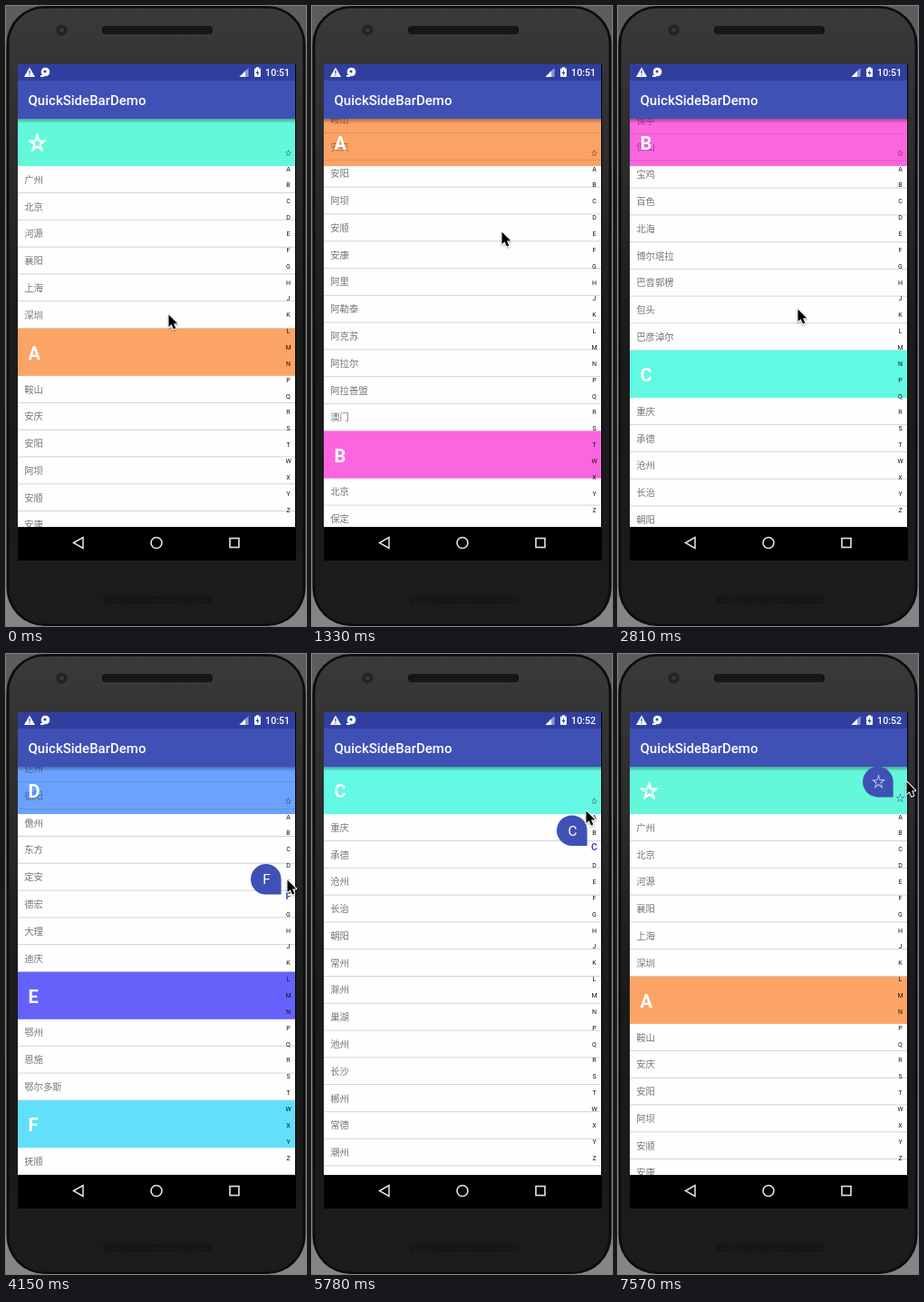
Recreate the animation shown at these times as an HTML page with a canvas. Size 331 by 682 pixels, loop 8000 ms.

```html
<!DOCTYPE html>
<html lang="zh">
<head>
<meta charset="utf-8">
<title>QuickSideBarDemo</title>
<style>
html, body { margin: 0; width: 100%; height: 100%; overflow: hidden; background: #4a4a4c }
canvas { display: block }
</style>
</head>
<body>
<canvas id="stage" width="331" height="682"></canvas>
<script>
const c = document.getElementById('stage').getContext('2d');
const LOOP = 8000, STEP = 148.4;
const LEFT = 13, WIDTH = 306, TOP = 124, VIEW = 449, HEAD = 52.1, ROW = 29.78;
const BLUE = '#3f51b5', NAVY = '#303f9f';
const LETTERS = [...'☆ABCDEFGHJKLMNPQRSTWXYZ'];

const sections = [
  ['#64f9db', '广州 北京 河源 襄阳 上海 深圳'],
  ['#fba465', '鞍山 安庆 安阳 阿坝 安顺 安康 阿里 阿勒泰 阿克苏 阿拉尔 阿拉善盟 澳门'],
  ['#fb66de', '北京 保定 本溪 白山 白城 蚌埠 亳州 滨州 巴中 毕节 白银 白沙 保亭 保山 宝鸡 百色 北海 博尔塔拉 巴音郭楞 包头 巴彦淖尔'],
  ['#62f9e3', '重庆 承德 沧州 长治 朝阳 常州 滁州 巢湖 池州 长沙 郴州 常德 潮州 长春 成都 澄迈 昌江 楚雄 崇左 昌都 昌吉 赤峰'],
  ['#6ba2ff', '大同 大连 丹东 大庆 大兴安岭 东营 德州 东莞 定西 达州 德阳 儋州 东方 定安 德宏 大理 迪庆'],
  ['#6562fb', '鄂州 恩施 鄂尔多斯'],
  ['#62e0fb', '抚顺 阜新 福州 阜阳 抚州 佛山 防城港'],
  ['#fba465', '赣州 广州 广元 广安 甘孜 贵阳 果洛 甘南 固原 桂林 贵港'],
  ['#6ba2ff', '邯郸 衡水 葫芦岛 哈尔滨 鹤岗 黑河 淮安 杭州 湖州 合肥 淮南 淮北 黄山 菏泽 鹤壁 黄石 黄冈 衡阳 怀化 惠州 河源 海口 红河 汉中 海东 河池 贺州 哈密 和田 呼和浩特 呼伦贝尔'],
  ['#fb66de', '晋城 晋中 锦州 吉林 鸡西 佳木斯 嘉兴 金华 景德镇 九江 吉安 济南 济宁 焦作 荆门 荆州 江门 揭阳 嘉峪关 金昌 酒泉'],
  ['#62e0fb', '开封 昆明 克拉玛依 喀什 克孜勒苏'],
  ['#ff6992', '廊坊 临汾 吕梁 辽阳 辽源 连云港 丽水 六安 龙岩 临沂 聊城 洛阳 漯河 娄底 兰州 陇南 临夏 泸州 乐山 凉山 六盘水 临高 乐东 陵水 临沧 丽江 来宾 柳州 拉萨 林芝'],
  ['#64f9db', '牡丹江 马鞍山 茂名 梅州 绵阳 眉山']
].map(([color, names], i) => ({ letter: LETTERS[i], color, rows: names.split(' ') }));

let end = 0;
for (const s of sections) {
  s.top = end;
  end += HEAD + s.rows.length * ROW;
}

// Pointer stops: step, x, y, side bar index
const stops = [
  [0, 179, 339, 0], [9, 209, 248, 0], [19, 198, 333, 0], [28, 310, 248, 6], [35, 308, 341, 12],
  [39, 302, 172, 3], [46, 312, 148, 0], [49, 316, 166, 1], [51, 318, 140, 0]
];
const SWIPES = 3, PICKING = 26;
// List offsets where the swipes begin and end
const rests = [0, sections[2].top - 343.5, sections[3].top - 255, sections[3].top + 280];

const lerp = (a, b, u) => a + (b - a) * u;

function legAt(k) {
  const after = stops.findIndex(p => p[0] > k);
  const i = (after < 0 ? stops.length : after) - 1;
  const from = stops[i], to = stops[i + 1] || from;
  const u = to === from ? 0 : (k - from[0]) / (to[0] - from[0]);
  return { i, u, value: n => lerp(from[n], to[n], u) };
}

function pointerAt(k) {
  const { i, u, value } = legAt(k);
  const lift = i < SWIPES ? 100 * Math.sin(Math.PI * u) : 0;
  return [value(1), value(2) - lift];
}

const pickAt = k => k < PICKING ? -1 : Math.round(legAt(k).value(3));

// Swipes ease between rests; a picked letter scrolls only as far as its first row needs
function scrollAt(k) {
  const { i, u } = legAt(Math.min(k, PICKING - 1));
  let y = lerp(rests[i], rests[i + 1], u * u * (3 - 2 * u));
  for (let j = PICKING; j <= k; j++) {
    const { top } = sections[pickAt(j)];
    y = Math.max(Math.min(y, top), top + HEAD + ROW - VIEW);
  }
  return y;
}

function text(s, x, mid, size, color, weight = 400, align = 'left') {
  c.font = `${weight} ${size}px Roboto, "Noto Sans CJK SC", "Noto Sans CJK JP", sans-serif`;
  c.fillStyle = color;
  c.textAlign = align;
  c.fillText(s, x, mid + size * .36);
}

function box(x, y, w, h, color, r = 0) {
  c.fillStyle = color;
  c.beginPath();
  c.roundRect(x, y, w, h, r);
  c.fill();
}

function paint(fill, stroke, width) {
  if (fill) { c.fillStyle = fill; c.fill(); }
  if (stroke) { c.strokeStyle = stroke; c.lineWidth = width; c.stroke(); }
}

function poly(points, ...style) {
  c.beginPath();
  points.forEach(p => c.lineTo(...p));
  c.closePath();
  paint(...style);
}

function disc(x, y, r, ...style) {
  c.beginPath();
  c.arc(x, y, r, 0, 7);
  paint(...style);
}

function fade(y0, y1, ...colors) {
  const g = c.createLinearGradient(0, y0, 0, y1);
  colors.forEach((v, i) => g.addColorStop(i / (colors.length - 1), v));
  return g;
}

function speaker(x, y, w) {
  box(x, y, w, 9, '#131314', 4);
  c.fillStyle = '#303032';
  for (let i = 3; i < w - 3; i += 3)
    for (let j = 0; j < 3; j++) c.fillRect(x + i + j % 2, y + 1.5 + j * 2.5, 1, 1);
}

function phone() {
  box(0, 0, 331, 682, fade(0, 682, '#5c5c5c', '#868686'));
  box(.5, 0, 330, 682, '#0c0c0d', 42);
  box(3.5, 2.5, 324, 677, fade(0, 682, '#3a3a3b', '#2c2c2d', '#1c1c1d', '#1a1a1b', '#1c1c1d'), 39);
  disc(61.5, 26.5, 6, '#222224', '#2e2e30', 1);
  disc(61.5, 26.5, 2.5, '#39393d');
  speaker(106, 22, 122);
  speaker(107, 649, 121);
  box(LEFT, 64, WIDTH + 1, 546, '#000');
}

function bars(clock) {
  box(LEFT, 64, WIDTH, 18, NAVY);
  box(LEFT, 82, WIDTH, 42, BLUE);
  text('QuickSideBarDemo', 24.5, 104, 15, '#fff', 500);
  text(clock, 313, 73, 10.6, '#fff', 500, 'right');
  poly([[26, 67.5], [32, 78], [20, 78]], '#fff');
  box(25.4, 71, 1.2, 3.5, NAVY);
  box(25.4, 75.5, 1.2, 1.2, NAVY);
  disc(43.5, 72.5, 4.8, '#fff');
  disc(43, 72, 1.5, NAVY);
  box(38, 76, 4, 2, '#fff');
  poly([[267.5, 68], [267.5, 78], [257.5, 78]], '#8f98cc');
  poly([[264, 71.5], [264, 78], [257.5, 78]], '#fff');
  box(274, 68.5, 7, 9.5, '#fff', 1);
  box(276, 67.3, 3, 2, '#fff');
  poly([[278, 70], [275.5, 74], [277.3, 74], [277, 77], [279.5, 73], [277.7, 73]], NAVY);

  poly([[74.5, 590.5], [85, 584.5], [85, 596.5]], null, '#e4e4e4', 1.5);
  disc(166, 590.5, 6, null, '#e4e4e4', 1.6);
  c.strokeRect(247, 585.5, 10, 10);
}

function header(s, y) {
  c.fillStyle = s.color;
  c.fillRect(LEFT, y, WIDTH, HEAD);
}

function headerText({ letter }, y) {
  text(letter, 24.5, y + 27, 20, '#fff', 700);
  if (letter !== '☆') return;
  c.strokeStyle = '#fff';
  c.lineWidth = 1.2;
  c.strokeText(letter, 24.5, y + 34.2);
}

function list(scroll) {
  c.save();
  c.beginPath();
  c.rect(LEFT, TOP, WIDTH, VIEW);
  c.clip();
  box(LEFT, TOP, WIDTH, VIEW, '#fefefe');
  for (const s of sections) {
    const y = TOP + s.top - scroll;
    if (y > TOP) {
      header(s, y);
      headerText(s, y);
    }
    s.rows.forEach((name, i) => {
      const r = y + HEAD + i * ROW;
      if (r < TOP - ROW || r > TOP + VIEW) return;
      text(name, 20.2, r + 14.9, 10.4, '#757575');
      c.fillStyle = '#d4d4d4';
      c.fillRect(LEFT, r + ROW - .8, WIDTH, 1);
    });
  }
  // Sticky header, pushed away by the next one; rows show through faintly
  const n = sections.findLastIndex(s => s.top <= scroll + .01);
  const next = sections[n + 1];
  const y = TOP + Math.min(0, next ? next.top - scroll - HEAD : 0);
  c.globalCompositeOperation = 'multiply';
  header(sections[n], y);
  c.globalCompositeOperation = 'source-over';
  c.globalAlpha = .3;
  header(sections[n], y);
  c.globalAlpha = 1;
  headerText(sections[n], y);
  box(LEFT, TOP, WIDTH, 5, fade(TOP, TOP + 5, 'rgba(0,0,0,.32)', 'rgba(0,0,0,0)'));
  c.restore();
}

function sideBar(pick) {
  LETTERS.forEach((s, i) => {
    const y = 161.2 + i * 17.86;
    if (i === pick) text(s, 311.5, y - 2.6, 10.5, BLUE, 700, 'center');
    else text(s, 311.5, y, 7, '#111', 400, 'center');
  });
  if (pick < 0) return;
  const y = 140.6 + pick * 17.86;
  box(270, y - 16.8, 33.6, 33.6, BLUE, [17, 17, 0, 17]);
  text(LETTERS[pick], 287.5, y, 15.5, '#fff', 400, 'center');
}

function pointer(x, y) {
  c.save();
  c.translate(x, y);
  c.shadowColor = 'rgba(0,0,0,.35)';
  c.shadowBlur = 2;
  c.shadowOffsetY = 1;
  c.lineJoin = 'round';
  const arrow = [[.5, .5], [.5, 14], [3.6, 11.2], [6, 16.6], [8.3, 15.6], [6, 10.4], [10.2, 10.2]];
  poly(arrow, null, '#fff', 2);
  c.shadowColor = 'transparent';
  poly(arrow, '#000');
  c.restore();
}

function draw() {
  const k = Math.floor((performance.now() % LOOP + 10) / STEP);
  phone();
  list(scrollAt(k));
  sideBar(pickAt(k));
  bars(k < 33 ? '10:51' : '10:52');
  pointer(...pointerAt(k));
  requestAnimationFrame(draw);
}
draw();
</script>
</body>
</html>
```
